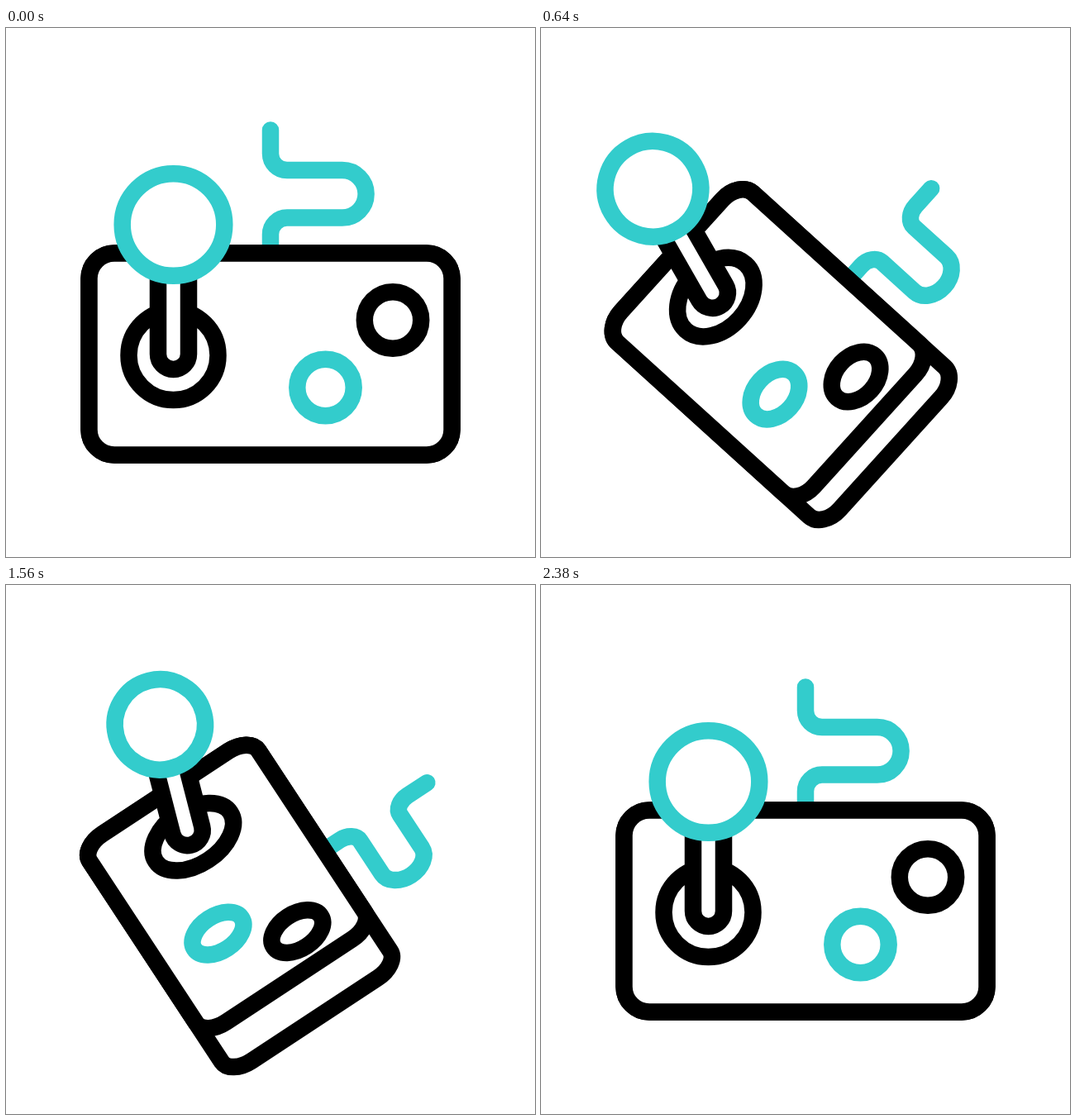
An HTML page with a canvas that plays this animation: 640 by 640 pixels, repeating every 2.4 s.

```html
<!DOCTYPE html>
<html>
<head>
<meta charset="utf-8">
<title>Joystick</title>
<style>
html, body { margin: 0; width: 100%; height: 100%; overflow: hidden; background: #fff; }
canvas { display: block; width: 640px; height: 640px; }
</style>
</head>
<body>
<canvas id="stage" width="640" height="640"></canvas>
<script>
const ctx = document.getElementById('stage').getContext('2d');
const LOOP = 2400, PEAK = 1160, END = 2390;
const BLACK = '#000', TEAL = '#33cccc', WHITE = '#fff';
const PIVOT = { x: 296, y: 378 };
const MAX_TILT = 63.8;
const MAX_LEAN = 72, LEAN_BACK = 30;

function ease(u) {
  u = Math.min(1, Math.max(0, u));
  return u < 0.5 ? 0.5 * (2 * u) ** 3.5 : 1 - 0.5 * (2 - 2 * u) ** 3.5;
}

// Eased 0 to 1 between two times
const ramp = (t, from, to) => ease((t - from) / (to - from));

const tiltAt = t => MAX_TILT * (ramp(t, 0, PEAK) - ramp(t, PEAK, END));

// Angle of the stick relative to the body: out, partly back, out again, home
const leanAt = t =>
  -MAX_LEAN * (ramp(t, 0, 650) - ramp(t, 1676, END)) +
  LEAN_BACK * (ramp(t, 650, PEAK) - ramp(t, PEAK, 1676));

// The stick shortens with the tilt and stretches once on its way across
function reachAt(t, tilt) {
  const u = Math.min(1, Math.max(0, (t - 610) / (PEAK - 610)));
  return 156.5 * (1 - 4.9e-5 * tilt * tilt) + 62 * Math.sin(Math.PI * u) ** 2;
}

// Shapes are squeezed, outlines keep their width
function shape(matrix, build, color, fill) {
  ctx.setTransform(matrix);
  ctx.beginPath();
  build();
  ctx.resetTransform();
  if (fill) {
    ctx.fillStyle = fill;
    ctx.fill();
  }
  ctx.strokeStyle = color;
  ctx.stroke();
}

const circle = (x, y, r) => () => ctx.arc(x, y, r, 0, 2 * Math.PI);
const box = width => () => ctx.roundRect(100.5, 272.5, width, 244, 30.6);

function cable() {
  ctx.moveTo(320, 123.5);
  ctx.lineTo(320, 152);
  ctx.arc(340, 152, 20, Math.PI, Math.PI / 2, true);
  ctx.lineTo(406.8, 172);
  ctx.arc(406.8, 200.8, 28.8, -Math.PI / 2, Math.PI / 2);
  ctx.lineTo(340, 229.6);
  ctx.arc(340, 249.6, 20, -Math.PI / 2, Math.PI, true);
  ctx.lineTo(320, 268);
}

function draw(t) {
  const tilt = tiltAt(t);
  const squeeze = 1 - 0.0067 * tilt;
  const depth = 1 - 0.00444 * tilt;

  // Squeeze about x0, which sits at "x" beside the pivot, then tilt
  const place = (x, x0, scale) => new DOMMatrix()
    .translate(PIVOT.x, PIVOT.y).rotate(tilt)
    .translate(x, -PIVOT.y).scale(scale, 1).translate(-x0, 0);
  const face = place(-93.5 - 0.105 * tilt, 202.5, squeeze);
  const cord = place(24 - 0.4 * tilt, 320, 1 - 0.005 * tilt);

  ctx.resetTransform();
  ctx.fillStyle = WHITE;
  ctx.fillRect(0, 0, 640, 640);
  ctx.lineWidth = 20.5;
  ctx.lineCap = 'round';
  ctx.lineJoin = 'round';

  shape(cord, cable, TEAL);
  shape(face, box(439 * depth / squeeze), BLACK, WHITE);
  shape(face, box(439), BLACK, WHITE);
  shape(face, circle(386.5, 435, 34.2), TEAL);
  shape(face, circle(468, 353.5, 34.2), BLACK);
  shape(face, circle(202.5, 396, 54), BLACK);

  const ring = face.transformPoint(new DOMPoint(202.5, 396));
  const reach = reachAt(t, tilt);
  const stick = new DOMMatrix()
    .translate(ring.x - 0.0022 * tilt * tilt, ring.y - 1.5 - 0.0021 * tilt * tilt)
    .rotate(tilt + leanAt(t));

  shape(stick, () => {
    ctx.moveTo(18.5, -reach);
    ctx.lineTo(18.5, 0);
    ctx.arc(0, 0, 18.5, 0, Math.PI);
    ctx.lineTo(-18.5, -reach);
  }, BLACK, WHITE);
  shape(stick, circle(0, -reach, 61.8 * (1 - 3.6e-5 * tilt * tilt)), TEAL, WHITE);
}

const start = performance.now();
function frame() {
  draw((performance.now() - start) % LOOP);
  requestAnimationFrame(frame);
}
frame();
</script>
</body>
</html>
```
